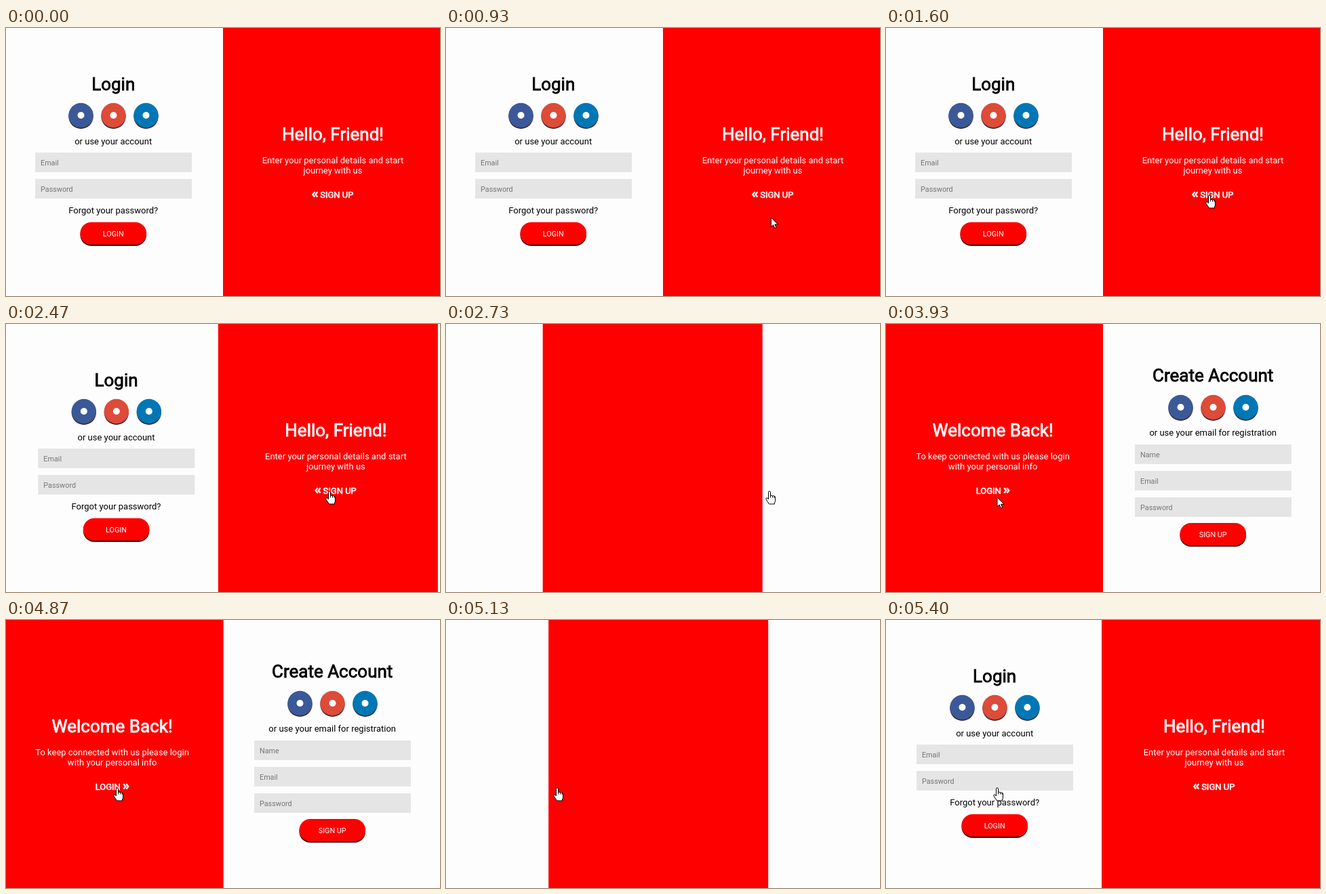
Animation, 640 px wide and 396 px high, one loop 5.47 s. Source, as an HTML page:

```html
<!DOCTYPE html>
<html lang="en">
<head>
<meta charset="utf-8">
<title>Sliding login form</title>
<style>
  html, body { margin: 0; width: 100%; height: 100%; overflow: hidden; background: #fefdfe; }
  svg { display: block; font: 13px Roboto, sans-serif; }
  .mid { text-anchor: middle; }
  .title { font-size: 26px; stroke-width: .8px; }
  .heavy { stroke-width: .6px; }
  .small { font-size: 10.8px; }
  .title, .heavy { stroke: currentColor; fill: currentColor; }
  #words { color: #fff; fill: #fff; }
</style>
</head>
<body>
<svg width="640" height="396" viewBox="0 0 640 396">
  <defs><clipPath id="clip"><rect id="hole" width="324" height="396"/></clipPath></defs>
  <g id="forms"><g id="login"></g><g id="signup"></g></g>
  <rect id="panel" width="324" height="396" fill="#f00"/>
  <g clip-path="url(#clip)"><g id="words"></g></g>
  <g id="cursor" fill="#fff" stroke="#000" stroke-linejoin="round">
    <path id="arrow" d="M0 0V14L3.2 11L5.4 16L7.6 15L5.5 10.3H10Z"/>
    <path id="hand" d="M-1.5 11V1.5Q-1.5 0 0 0T1.5 1.5V6.5Q3 5.5 4.5 7Q6 6 7 7.5Q8.5 7 8.5 9V14Q8.5 16 7.5 17V19H-.5L-4.5 13Q-6 11-4.5 10Q-3 9.5-1.5 12ZM1.5 6.5V9.5M4.5 7V9.5M7 7.5V10"/>
  </g>
</svg>
<script>
const $ = id => document.getElementById(id);
const LOOP = 5470, STEP = 200 / 3, HALF = 324, MID = 158.2;

const text = (x, y, s, cls = 'mid') => `<text x="${x}" y="${y}" class="${cls}">${s}</text>`;

const field = (y, label) =>
  `<rect x="43" y="${y}" width="231" height="29" fill="#e6e5e6"/>
   <g fill="#757575">${text(51, y + 19, label, 'small')}</g>`;

const social = top => ['#3b5998', '#dd4b39', '#0077b5'].map((color, i) => {
  const x = 110.5 + 48 * i, y = top + 18;
  return `<circle cx="${x}" cy="${y + 1.8}" r="18.2" fill="#3a2a35"/>
    <circle cx="${x}" cy="${y}" r="18.2" fill="${color}"/>
    <circle cx="${x}" cy="${y}" r="5" fill="#fff"/>`;
}).join('');

const button = (y, label) =>
  `<rect x="109.5" y="${y + 2}" width="97.5" height="33" rx="16" fill="#400a0a"/>
   <rect x="109.5" y="${y}" width="97.5" height="33" rx="16" fill="#f00"/>
   <g fill="#fff">${text(MID, y + 20.5, label, 'mid small')}</g>`;

const chevrons = (x, dir) => [0, 4].map(dx =>
  `<path d="M${x + dx} 242.3l${3 * dir} 3.7l${-3 * dir} 3.7" fill="none" stroke="#fff" stroke-width="2.2"/>`).join('');

const greeting = (x, title, line1, line2) =>
  text(x, 166, title, 'mid title') + text(x, 199.7, line1) + text(x, 215, line2);

$('login').innerHTML = text(MID, 91.5, 'Login', 'mid title') + social(111) +
  text(MID, 171.5, 'or use your account') + field(184, 'Email') + field(223, 'Password') +
  text(MID, 274, 'Forgot your password?') + button(287, 'LOGIN');

$('signup').innerHTML = text(MID, 85, 'Create Account', 'mid title') + social(105) +
  text(MID, 165, 'or use your email for registration') + field(178, 'Name') +
  field(217, 'Email') + field(256, 'Password') + button(294, 'SIGN UP');

// The left greeting waits one half-width outside its resting place.
$('words').innerHTML =
  greeting(482, 'Hello, Friend!', 'Enter your personal details and start', 'journey with us') +
  chevrons(455.3, -1) + text(463.2, 250.7, 'SIGN UP', 'heavy') +
  `<g transform="translate(${-HALF})">` +
  greeting(157.6, 'Welcome Back!', 'To keep connected with us please login', 'with your personal info') +
  text(132.7, 250.7, 'LOGIN', 'heavy') + chevrons(174.3, 1) + '</g>';

// cubic-bezier(.42, 0, .58, 1)
function ease(x) {
  if (x <= 0) return 0;
  if (x >= 1) return 1;
  let lo = 0, hi = 1, s;
  for (let i = 0; i < 24; i++) {
    s = (lo + hi) / 2;
    const bx = 1.26 * s * (1 - s) ** 2 + 1.74 * s * s * (1 - s) + s ** 3;
    if (bx < x) lo = s; else hi = s;
  }
  return s * s * (3 - 2 * s);
}

// Returns [x, y, isHand], or null while the pointer is away.
function pointer(k) {
  if (k < 7) return null;
  if (k < 16) {
    const u = (k - 7) / 8;
    return [162 + 318 * (1 - (1 - u) ** 3), 356 - 87 * u, false];
  }
  if (k < 25) {
    const u = (k - 15) / 9, y = 269 - 22 * u;
    return [480 - 3 * u, y, y < 255];
  }
  if (k < 51) return [477, 247, true];
  if (k < 60) {
    const u = (k - 50) / 9;
    return [477 - 313 * ease(u), 247 + 9 * u, false];
  }
  return [164, k < 61 ? 251 : 248, true];
}

function draw(now) {
  const k = Math.floor((now % LOOP + 5) / STEP) % 82, t = k * STEP;
  const slide = ease((t - 2417) / 600) - ease((t - 4843) / 590);
  const cover = ease((t - 2400) / 632) - ease((t - 4848) / 585);
  const shift = `translate(${HALF * slide})`;

  $('forms').setAttribute('transform', shift);
  $('words').setAttribute('transform', shift);
  $('login').style.display = slide > .5 ? 'none' : '';
  $('signup').style.display = slide > .5 ? '' : 'none';
  for (const id of ['panel', 'hole']) $(id).setAttribute('x', 320 - HALF * cover);

  const p = pointer(k);
  $('cursor').style.display = p ? '' : 'none';
  if (p) {
    $('cursor').setAttribute('transform', `translate(${p[0]} ${p[1]})`);
    $('hand').style.display = p[2] ? '' : 'none';
    $('arrow').style.display = p[2] ? 'none' : '';
  }
}

const start = performance.now();
(function tick() {
  draw(performance.now() - start);
  requestAnimationFrame(tick);
})();
</script>
</body>
</html>
```
